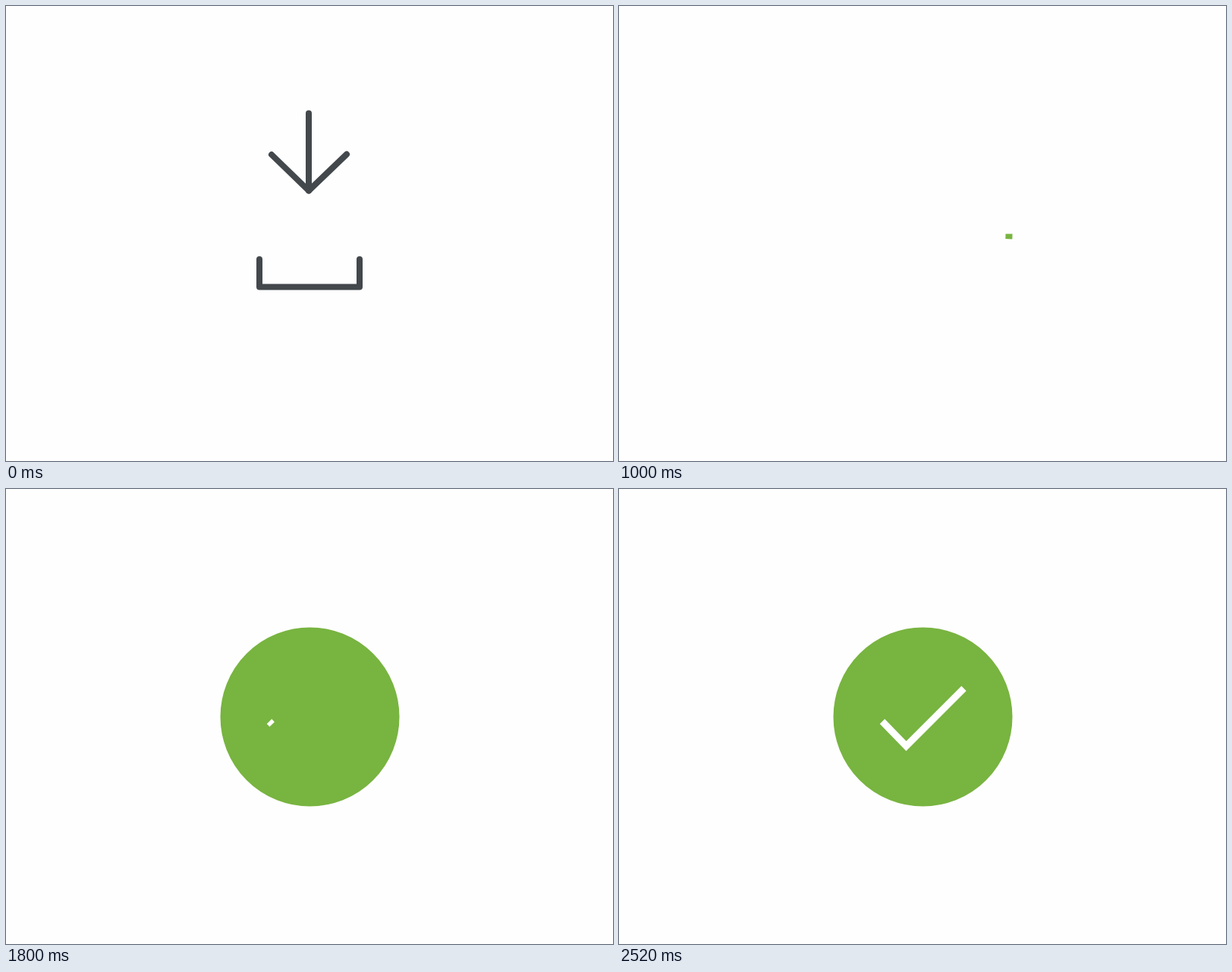
Animation, 800 px wide and 600 px high, one loop 2620 ms. Source, as an HTML page with a canvas:

```html
<!DOCTYPE html>
<html lang="en">
<head>
<meta charset="utf-8">
<title>Download complete</title>
<style>
  html, body { margin: 0; width: 100%; height: 100%; overflow: hidden; background: #fefefe; }
  canvas { display: block; }
</style>
</head>
<body>
<canvas id="stage" width="800" height="600"></canvas>
<script>
const ctx = document.getElementById('stage').getContext('2d');
const LOOP = 2620, STEP = 20;
const PAPER = '#fefefe', INK = '#43484c', GREEN = '#78b440';
const CX = 400.5, CY = 300.5, OUTER = 118, RING = 9;

const progress = (t, from, to) => Math.min(1, Math.max(0, (t - from) / (to - from)));
const smooth = u => u * u * (3 - 2 * u);
const ease = (t, from, to) => smooth(progress(t, from, to));

function bezier(x1, y1, x2, y2) {
  const at = (a, b, s) => 3 * (1 - s) ** 2 * s * a + 3 * (1 - s) * s * s * b + s ** 3;
  return x => {
    let lo = 0, hi = 1;
    for (let i = 0; i < 24; i++) {
      const mid = (lo + hi) / 2;
      if (at(x1, x2, mid) < x) lo = mid; else hi = mid;
    }
    return at(y1, y2, (lo + hi) / 2);
  };
}
const windUp = bezier(0.25, -0.55, 0.68, 1);

function polyline(points, color, width, cap) {
  ctx.beginPath();
  points.forEach(([x, y]) => ctx.lineTo(x, y));
  ctx.strokeStyle = color;
  ctx.lineWidth = width;
  ctx.lineCap = cap;
  ctx.lineJoin = cap === 'round' ? 'round' : 'miter';
  ctx.stroke();
}

function drawDownload(t) {
  const drop = 109.5 * windUp(progress(t, 0, 640));
  const ink = points => polyline(points, INK, 8, 'round');
  ctx.save();
  ctx.globalAlpha = 1 - ease(t, 730, 980);
  ink([[334, 334], [334, 370.5], [466, 370.5], [466, 334]]);
  ctx.translate(0, drop);
  ink([[399, 141.5], [399, 243.5]]);
  ink([[350, 196], [399, 243.5], [449, 195.5]]);
  ctx.restore();
}

function drawRing(t) {
  const sweep = ease(t, 975, 1412);
  if (!sweep) return;
  const inner = (OUTER - RING) * (1 - ease(t, 1415, 1692));
  const width = OUTER - inner;
  ctx.beginPath();
  ctx.arc(0, 0, OUTER - width / 2, 0, sweep * 2 * Math.PI);
  ctx.strokeStyle = GREEN;
  ctx.lineWidth = width;
  ctx.lineCap = 'butt';
  ctx.stroke();
}

function drawCheck(t) {
  const drawn = ease(t, 1770, 2040);
  if (!drawn) return;
  const start = [-53.5, 6], corner = [-22, 38.5], end = [54, -37.5];
  const dist = (a, b) => Math.hypot(b[0] - a[0], b[1] - a[1]);
  const along = (a, b, p) => a.map((v, i) => v + (b[i] - v) * p);
  const short = dist(start, corner), long = dist(corner, end);
  const length = drawn * (short + long);
  const points = length <= short
    ? [start, along(start, corner, length / short)]
    : [start, corner, along(corner, end, (length - short) / long)];
  polyline(points, '#fff', 9, 'butt');
}

function draw(t) {
  ctx.fillStyle = PAPER;
  ctx.fillRect(0, 0, 800, 600);
  if (t < 980) drawDownload(t);

  const scale = 1 + 0.1 * (ease(t, 1890, 2080) - ease(t, 2080, 2310));
  ctx.save();
  ctx.translate(CX, CY);
  ctx.scale(scale, scale);
  drawRing(t);
  drawCheck(t);
  ctx.restore();
}

const began = performance.now();
function tick() {
  const t = (performance.now() - began) % LOOP;
  draw(Math.floor(t / STEP) * STEP);
  requestAnimationFrame(tick);
}
tick();
</script>
</body>
</html>
```
